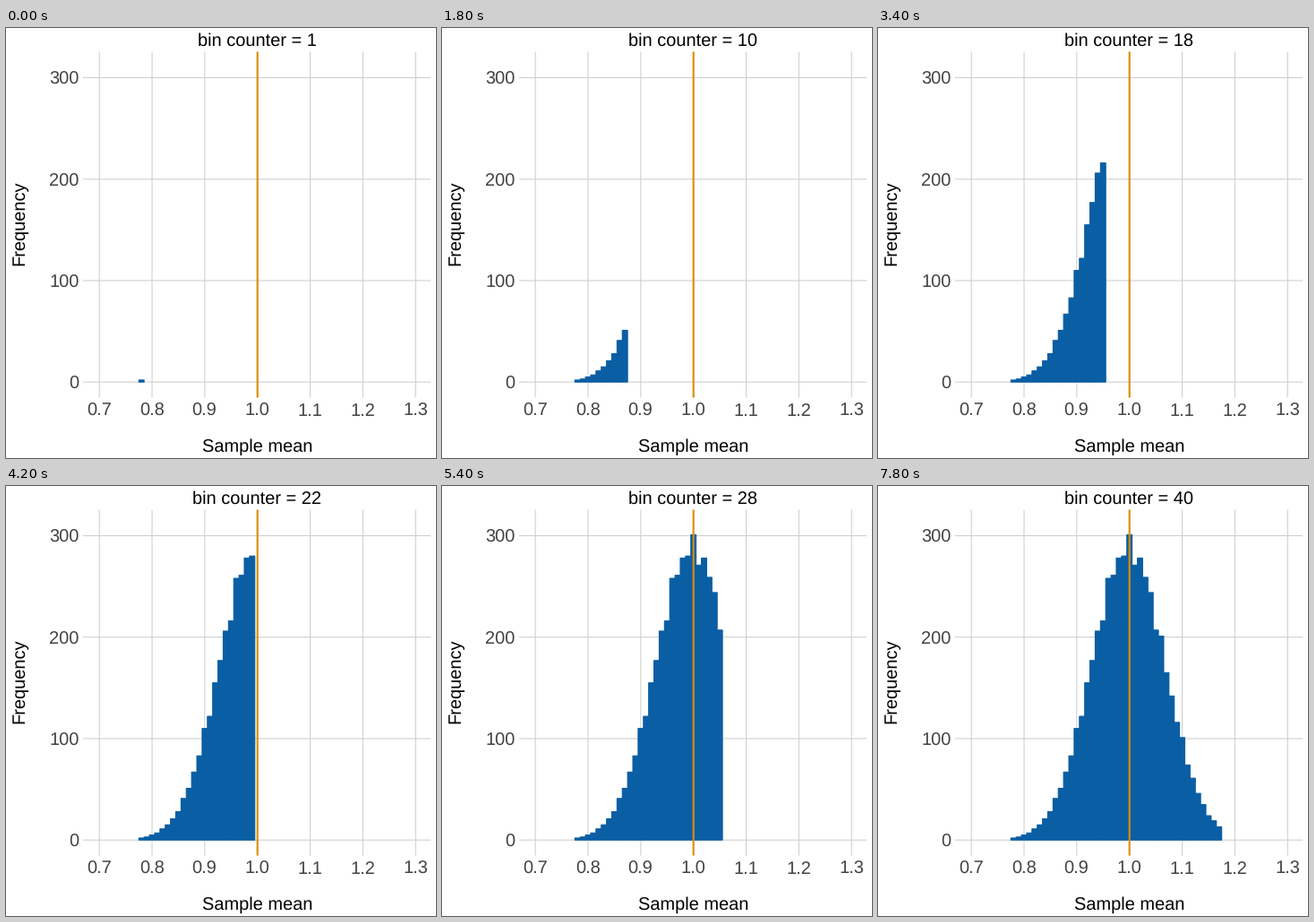
Write a matplotlib script that moves like this. It is 480 px wide and 480 px high and loops after 8000 ms.

```python
import numpy as np
import matplotlib.pyplot as plt
from matplotlib.animation import FuncAnimation
from matplotlib.patches import Rectangle

SIZE, DPI = 480, 100
PX = 72 / DPI  # points per pixel
LEFT, RIGHT, TOP, BOTTOM = 86, 474, 26.5, 412.5
BLUE, ORANGE = "#0a5ea4", "#de8c05"
GRID, TICK = "#cfcfcf", "#434343"
BINS, BIN, FIRST = 40, 0.01, 0.78

plt.rcParams["font.family"] = "Liberation Sans"
plt.rcParams["font.size"] = 20 * PX
plt.rcParams["text.hinting"] = "none"

fig = plt.figure(figsize=(SIZE / DPI, SIZE / DPI), dpi=DPI, facecolor="white")
ax = fig.add_axes([0, 0, 1, 1])
ax.set_xlim(0, SIZE)
ax.set_ylim(SIZE, 0)
ax.axis("off")


def x_px(mean):
    return 280.7 + 588.4 * (mean - 1)


def y_px(count):
    return 395.2 - 1.1323 * count


def bin_counts():
    """Bell curve of sample means with a little unevenness between bins."""
    i = np.arange(BINS)
    z = (FIRST + BIN * i - 0.998) / 0.069
    ripple = 0.025 * np.cos(np.pi * i) - 0.025 * np.cos(2 * np.pi * (i - 10) / 3.35)
    return np.round(288 * np.exp(-z * z / 2) * (1 + ripple))


def line(xs, ys, color, width, z):
    ax.plot(xs, ys, color=color, lw=width * PX, zorder=z,
            solid_capstyle="butt", snap=False)


def label(x, y, text, color="black", ha="center", **kw):
    return ax.text(x, y, text, color=color, ha=ha, va="baseline", **kw)


for i in range(7):
    mean = 0.7 + 0.1 * i
    line([x_px(mean)] * 2, [TOP, BOTTOM], GRID, 1.07, 1)
    label(x_px(mean) - 0.3, 433, f"{mean:.1f}", TICK)

for count in range(0, 301, 100):
    line([LEFT, RIGHT], [y_px(count)] * 2, GRID, 1.07, 1)
    label(81.5, y_px(count) + 7.6, str(count), TICK, "right")

line([x_px(1)] * 2, [TOP, BOTTOM], ORANGE, 2.1, 3)

label(280.5, 473, "Sample mean")
label(20, 218, "Frequency", rotation=90, rotation_mode="anchor")
title = label(280, 20, "")

width = 588.4 * BIN
bars = []
for i, count in enumerate(bin_counts()):
    left = x_px(FIRST + BIN * i) - width / 2
    bar = Rectangle((left, y_px(count)), width, y_px(0) - y_px(count),
                    facecolor=BLUE, edgecolor=BLUE, lw=1.1 * PX,
                    zorder=2, snap=False)
    bars.append(ax.add_patch(bar))


def draw(frame):
    for i, bar in enumerate(bars):
        bar.set_visible(i <= frame)
    title.set_text(f"bin counter = {frame + 1}")
    return bars + [title]


anim = FuncAnimation(fig, draw, frames=BINS, interval=200,
                     repeat=True, repeat_delay=0)
plt.show()
```
